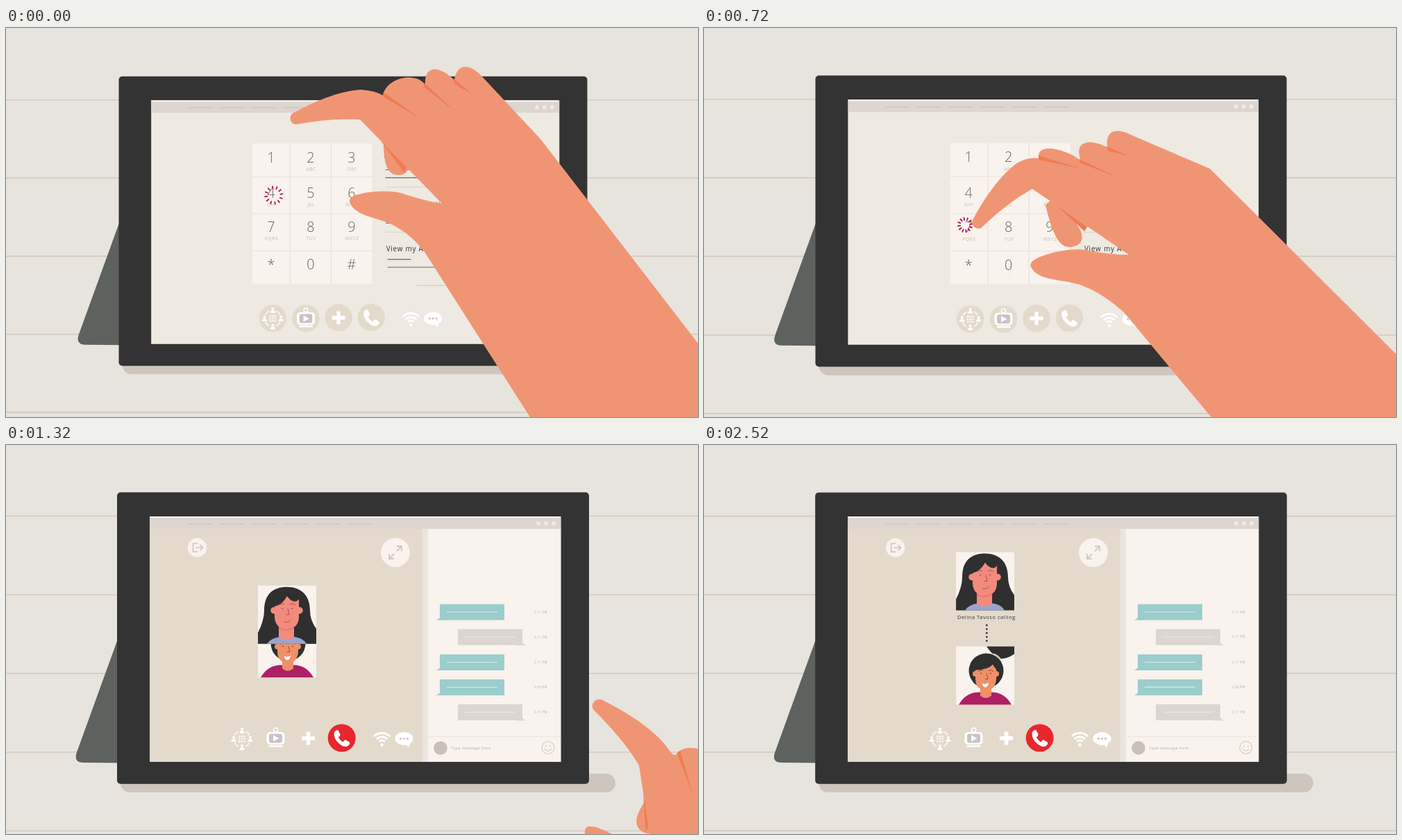
These frames come from a looping animation (997 px wide and 561 px high, 2560 ms). An HTML page with a canvas:

```html
<!DOCTYPE html>
<html lang="en">
<head>
<meta charset="utf-8">
<title>Tablet call</title>
<style>
html, body { margin: 0; width: 100%; height: 100%; overflow: hidden; background: #e7e4dd; }
canvas { display: block; width: 997px; height: 561px; }
</style>
</head>
<body>
<canvas id="stage" width="997" height="561"></canvas>
<script>
const g = document.getElementById("stage").getContext("2d");
const LOOP = 2560, STEP = 40;
const FONT = '"Open Sans", "Noto Sans", sans-serif';
const CREAM = "#f9f2ed", TAN = "#e4dacb", DARK = "#333333", GREY = "#ddd5d0", TEAL = "#9bcdcd";
const SKIN = "#f09574", SHADE = "#ee7c52";

const clamp = v => Math.max(0, Math.min(1, v));
const ramp = (t, a, b) => clamp((t - a) / (b - a));
const sine = u => 0.5 - 0.5 * Math.cos(Math.PI * u);
const mix = (a, b, u) => a + (b - a) * u;

function rect(x, y, w, h, color, r = 0) {
  g.fillStyle = color;
  g.beginPath();
  g.roundRect(x, y, w, h, r);
  g.fill();
}
function disc(x, y, r, color) {
  g.fillStyle = color;
  g.beginPath();
  g.arc(x, y, r, 0, 7);
  g.fill();
}
function line(x1, y1, x2, y2, color, w = 1) {
  g.strokeStyle = color;
  g.lineWidth = w;
  g.beginPath();
  g.moveTo(x1, y1);
  g.lineTo(x2, y2);
  g.stroke();
}
function fillPath(d, color) {
  g.fillStyle = color;
  g.fill(new Path2D(d));
}
function strokePath(d, color, w) {
  g.strokeStyle = color;
  g.lineWidth = w;
  g.stroke(new Path2D(d));
}
function text(s, x, y, size, color, spacing = 0, align = "left", weight = 400) {
  g.font = `${weight} ${size}px ${FONT}`;
  g.letterSpacing = spacing + "px";
  g.textAlign = align;
  g.fillStyle = color;
  g.fillText(s, x, y);
}
function group(x, y, alpha, draw) {
  if (alpha <= 0) return;
  g.save();
  g.translate(x, y);
  g.globalAlpha *= alpha;
  draw();
  g.restore();
}

// Icons, each around its own centre
function network() {
  for (let i = 0; i < 4; i++) {
    g.save();
    g.rotate(i * Math.PI / 2);
    g.strokeStyle = "#fff";
    g.lineWidth = 1.4;
    g.beginPath();
    g.arc(0, 0, 12, 0.45, 1.12);
    g.stroke();
    g.restore();
    const x = 12 * Math.cos(i * Math.PI / 2), y = 12 * Math.sin(i * Math.PI / 2);
    disc(x, y - 2.2, 2, "#fff");
    fillPath(`M${x - 3.6},${y + 4}q0,-4 3.6,-4q3.6,0 3.6,4z`, "#fff");
  }
  for (let i = 0; i < 9; i++) rect(i % 3 * 3.6 - 4.7, (i / 3 | 0) * 3.6 - 4.7, 2.2, 2.2, "#fff");
}
function video() {
  g.strokeStyle = "#fff";
  g.lineWidth = 1.5;
  g.beginPath();
  g.arc(0, -12, 3, 0, 7);
  g.stroke();
  rect(-13, -9, 26, 18, "#fff", 5);
  rect(-9.5, -6.5, 19, 13, "#c9c3c8", 3);
  fillPath("M-3.5,-4.5L5,0L-3.5,4.5z", "#fff");
  rect(-10, 10, 20, 2.6, "#fff", 1.3);
}
function plus() {
  rect(-9.5, -2.8, 19, 5.6, "#fff");
  rect(-2.8, -9.5, 5.6, 19, "#fff");
}
function handset() {
  fillPath("M-11,-8Q-8,-13 -5,-11L-2,-5Q-2,-3 -5,-1Q-2,4 2,6Q4,2 6,3L11,6Q13,9 8,12Q3,14 -4,8Q-12,1 -11,-8z", "#fff");
}
function wifi() {
  g.strokeStyle = "#fff";
  g.lineWidth = 2.8;
  for (const r of [6, 11, 16.5]) {
    g.beginPath();
    g.arc(0, 8, r, -2.36, -0.78);
    g.stroke();
  }
  disc(0, 8.5, 2.3, "#fff");
}
function chat() {
  g.fillStyle = "#fff";
  g.beginPath();
  g.ellipse(0, -1, 13, 9.5, 0, 0, 7);
  g.fill();
  fillPath("M1,6L7,12L9,4z", "#fff");
  for (const x of [-5, 0, 5]) disc(x, -1, 1.6, "#cfc6bd");
}

function tablet() {
  for (let i = 0; i < 5; i++) line(-20, 102.5 + i * 113.5, 1020, 102.5 + i * 113.5, "#d4c8c1", 1.7);
  fillPath("M161,280L102,443Q97,457 110,458L161,458.5z", "#5e625e");
  rect(165, 474, 713, 27, "#cec5bc", 13.5);
  rect(160, 68.3, 680, 420.5, DARK, 5);
  rect(207, 103, 592.5, 354, "#eee9e1");
}
function topBar() {
  rect(207, 105, 592.5, 16, GREY);
  line(207, 104, 797.5, 104, "#fbf5f0", 1.8);
  for (let i = 0; i < 6; i++) line(261 + i * 46, 113.7, 296 + i * 46, 113.7, "#cdc3be", 1.2);
  for (let i = 0; i < 3; i++) disc(767 + i * 11, 113, 3, "#f1e9e4");
}

function keypad() {
  const cols = [[354, 408], [409.5, 467.5], [469, 528]];
  const rows = [[165.5, 213.5], [214.7, 267], [268.3, 321], [322.3, 370]];
  const letters = ["", "ABC", "DEF", "GHI", "JKL", "MNO", "PQRS", "TUV", "WXYZ", "", "-", ""];
  rect(354, 165.5, 174, 204.5, "#ebe4de");
  [..."123456789*0#"].forEach((key, i) => {
    const [x1, x2] = cols[i % 3], row = i / 3 | 0, [y1, y2] = rows[row];
    const x = [381, 438.5, 498][i % 3], y = [193, 244.5, 294, 349][row];
    rect(x1, y1, x2 - x1, y2 - y1, CREAM);
    text(key, x, y, 20, "#6b6765", 0, "center", 300);
    text(letters[i], x + 0.7, y + (row === 3 ? 9 : 12.7), 6.8, "#c4bcb7", 0.5, "center");
  });

  const list = [["Your Vomber", 545, 192], ["Your Subscriptions", 546, 258], ["View my Account", 548, 322]];
  list.forEach(([label, x, y]) => {
    text(label, x, y, 10, DARK, 0.75);
    line(x + 2, y + 12, x + 36, y + 12, "#6a6865", 1.2);
    line(x + 2, y + 23.5, x + 94, y + 23.5, "#6a6865", 1.2);
  });
  line(547, 229, 640, 229, "#dad1c6");
  line(547, 294.5, 640, 294.5, "#dad1c6");
  line(592, 372, 684, 372, "#cfc6ba");

  [[383.5, 420, network], [431.5, 420, video], [479, 419, plus], [526.5, 418.5, handset]].forEach(([x, y, icon]) => {
    disc(x, y, 19.8, TAN);
    group(x, y, 1, icon);
  });
  group(584, 421, 1, wifi);
  group(616, 421, 1, chat);
}

function burst(t, x, y, start) {
  const k = (t - start) / 240;
  if (k < 0 || k > 1) return;
  const inner = 4 + 8.5 * k, outer = inner + 4.8;
  for (let i = 0; i < 12; i++) {
    const a = i * Math.PI / 6 - 0.15, c = Math.cos(a), s = Math.sin(a);
    line(x + c * inner, y + s * inner, x + c * outer, y + s * outer, "#b3124f", 1.8);
  }
}

// Portraits in an 84 px square
function caller() {
  const skin = "#f28b7d", ink = "#a04a48";
  rect(0, 0, 84, 84, CREAM);
  fillPath("M9,36C9,12 22,2 42,2C62,2 75,14 75,36Q75,50 84,62V84H0V68Q9,50 9,36z", "#2f2f2f");
  fillPath("M13,84Q18,76 31,74H53Q66,76 70,84z", "#9aa5cf");
  fillPath("M30,55H52V75Q41,82 30,75z", skin);
  disc(23, 36, 4.8, skin);
  disc(60, 36, 4.8, skin);
  fillPath("M24,30Q35,28 42,15Q47,21 59,20V46Q58,62 41,64Q25,61 24,46z", skin);
  strokePath("M30,61Q41,67 52,60", "#dd7568", 1.5);
  fillPath("M42,15Q49,13 58,18Q59,22 54,23Q47,23 42,15z", "#2f2f2f");
  disc(35, 33, 1, ink);
  disc(49, 33, 1, ink);
  strokePath("M30,28q4,-3 8,-1M46,27q4,-2 8,1M43,33l2,9h-5M38,52q6,3 9,-3", ink, 0.9);
}
function callee() {
  const skin = "#ee9069", ink = "#8d4334";
  rect(0, 0, 84, 84, CREAM);
  fillPath("M44,0H84V11Q74,18 62,18Q52,12 44,0z", "#2f2f2f");
  fillPath("M47,12Q56,6 65,18L58,25z", "#d8cdb4");
  disc(43.5, 35, 25, "#2f2f2f");
  fillPath("M4,84Q14,66 34,66H51Q70,66 80,84z", "#ad2064");
  fillPath("M35,56H51V71Q43,78 35,71z", skin);
  disc(28, 39.5, 4, skin);
  disc(58, 39.5, 4, skin);
  fillPath("M28,34Q46,34 53,26Q55,30 58,33V48Q56,63 43,64Q29,62 28,48z", skin);
  disc(36, 39, 1, ink);
  disc(50, 39, 1, ink);
  strokePath("M32,36q4,-3 7,-1M47,35q4,-2 7,1M44,39l2,8h-4", ink, 0.9);
  fillPath("M38,53Q43,56 47,52Q46,59 42,59Q38,58 38,53z", "#fff");
}

function chatPanel() {
  rect(600, 121, 8.5, 336, "#ebe5df");
  rect(608, 121, 191.5, 336, CREAM);
  [229.5, 265.5, 302, 338, 374].forEach((y, i) => {
    const mine = i % 3 === 1, x = mine ? 651 : 625;
    const tail = mine ? `M740,${y + 17}L749,${y + 23.5}H735z` : `M629,${y + 17}L620,${y + 23}H635z`;
    fillPath(tail, mine ? GREY : TEAL);
    rect(x, y, 93, 23, mine ? GREY : TEAL);
    line(x + 10, y + 11.3, x + 83, y + 11.3, mine ? "#ece5e0" : "#cfe6e4", 1.3);
    text(i === 3 ? "2:09 PM" : "2:11 PM", 761, y + 13, 4.4, "#b3aca8", 0.35);
  });
  line(608, 420.5, 799, 420.5, "#eee6e0");
  disc(626, 437, 9.8, "#c9c0b8");
  text("Type message here", 641, 439, 5.6, "#b0a8a3", 0.45);
  strokePath("M790,436.5a9,9 0 1 1 -18,0a9,9 0 1 1 18,0M776,438.5q5,5 10,0", "#d5cbc4", 1.1);
  disc(778, 434, 1, "#d5cbc4");
  disc(784, 434, 1, "#d5cbc4");
}

function callScreen(t) {
  rect(207, 121, 393, 336, "#e5e6db");
  const half = 145 * Math.max(0, t - 880) / 160;
  const left = Math.max(207, 395 - half), right = Math.min(600, 395 + half);
  rect(left, 121, right - left, 336, TAN);
  group(190 * (1 - sine(ramp(t, 880, 1000))), 0, 1, chatPanel);

  group(275.5, 148, ramp(t, 920, 1000), () => {
    disc(0, 0, 13.7, CREAM);
    strokePath("M1,-6H-6V6H1M-2,0H8M4,-4L8,0L4,4", "#cfc6c0", 1.7);
  });
  group(561, 155, ramp(t, 960, 1100), () => {
    disc(0, 0, 21, CREAM);
    strokePath("M2,-2L9,-9M2,-9H9V-2M-2,2L-9,9M-2,9H-9V2", "#cfc6c0", 1.8);
  });

  const split = sine(ramp(t, 1120, 1610));
  if (t >= 1120) group(363, mix(229.5, 290.5, split), 1, callee);
  group(363, mix(229.5, 154.5, split), ramp(t, 880, 960), caller);

  group(340, 424, 1, network);
  group(388.5, 423, 1, video);
  group(435.5, 423, 1, plus);
  disc(483.7, 422.5, 20, "#e8262d");
  group(483.7, 422.5, 1, handset);
  group(586, 421, 0.8 * (1 - ramp(t, 960, 1120)), wifi);
  group(541.5, 424, 1, wifi);
  group(573.5, 424.5, 1, chat);

  group(0, 0, ramp(t, 1720, 1880), () => text("Delina Tavoso calling", 365, 251, 7.5, DARK, 0.55));
  for (let i = 0; i < 5; i++) if (t >= 1880 + i * 80) disc(407.3, 260 + i * 5.6, 1.4, DARK);
}

// Hand: one outline whose points follow bones; a pose holds x, y, degrees and scale per bone
const PIVOTS = {
  low: [605, 326], thumb: [628, 253], index: [510, 132], curl: [566, 212],
  mid: [543, 97], tips: [646, 75], top: [770, 160]
};
const BONES = Object.keys(PIVOTS);
const pose = (...bones) => bones.map(([x, y, deg = 0, scale = 1]) => [x, y, deg, scale]);
const shift = (p, dx, dy) => p.map(([x, y, deg, scale]) => [x + dx, y + dy, deg, scale]);

const lifted = pose(...Object.values(PIVOTS));
const second = pose([672, 372, -1.5], [697, 299], [580, 177, -3], [632, 255], [610, 139], [708, 117, 4], [838, 202, -1.2]);
const reach = pose([605, 410, -7.2], [612, 327, -7.9, 1.07], [473, 232, -33], [533, 315, -15, 1.1],
  [482, 188, -18], [581, 172, -17], [729, 203, -7.5]);
const raised = pose([636, 282, 3], [648, 195, 14.8, 0.95], [570, 30, 25], [600, 134, 12],
  [603, -2, 14], [685, 14, 8], [808, 114, 3.3]);
const leaving = pose([872, 659, 39], [936, 617, 31, 0.9], [912, 462, 55, 1.12], [916, 557, 36],
  [968, 443, 39], [1062, 490, 39], [1105, 634, 39]);

const KEYS = [
  [0, lifted], [80, shift(lifted, 14, -10)], [230, shift(second, 12, 48)], [360, second],
  [480, shift(second, -14, -12)], [660, shift(reach, -9, 6)], [720, reach], [860, shift(reach, 112, 100)],
  [1040, raised], [1100, shift(raised, 14, -4)], [1320, leaving], [1480, shift(leaving, 190, 120)]
];

function poseAt(t) {
  const i = Math.max(0, KEYS.findIndex(k => k[0] > t) - 1);
  const key = n => KEYS[Math.max(0, Math.min(KEYS.length - 1, n))];
  const [k0, k1, k2, k3] = [key(i - 1), key(i), key(i + 1), key(i + 2)];
  const span = k2[0] - k1[0], u = (t - k1[0]) / span, v = 1 - u;
  return lifted.map((bone, b) => bone.map((_, c) => {
    const [p0, p1, p2, p3] = [k0, k1, k2, k3].map(k => k[1][b][c]);
    const m1 = (p2 - p0) / (k2[0] - k0[0]) * span, m2 = (p3 - p1) / (k3[0] - k1[0]) * span;
    return p1 * v * v * (1 + 2 * u) + m1 * u * v * v + p2 * u * u * (3 - 2 * u) - m2 * u * u * v;
  }));
}

function hand(t) {
  if (t >= 1480) return;
  const now = poseAt(t);
  const [low, thumb, index, curl, mid, tips, top] = BONES.map((name, b) => {
    const [px, py] = PIVOTS[name], [x, y, deg, scale] = now[b];
    const a = deg * Math.PI / 180, c = Math.cos(a) * scale, s = Math.sin(a) * scale;
    return (qx, qy) => [x + (qx - px) * c - (qy - py) * s, y + (qx - px) * s + (qy - py) * c];
  });
  const curve = (a, b, c) => g.bezierCurveTo(...a, ...b, ...c);
  const triangle = (a, b, c) => {
    g.fillStyle = SHADE;
    g.beginPath();
    g.moveTo(...a);
    g.lineTo(...b);
    g.lineTo(...c);
    g.fill();
  };

  g.fillStyle = SKIN;
  g.beginPath();
  g.moveTo(...curl(544, 150));
  curve(curl(543, 195), curl(548, 212), curl(566, 212));
  curve(curl(578, 212), curl(584, 203), curl(577, 185));
  g.lineTo(...curl(562, 140));
  g.fill();

  const base = index(510, 132), crotch = thumb(628, 253);
  const edge = u => [mix(base[0], crotch[0], u), mix(base[1], crotch[1], u)];
  const [ex, ey] = edge(0.57);
  triangle(edge(0.25), [ex, ey], [ex - 4, ey + 7]);

  g.fillStyle = SKIN;
  g.beginPath();
  g.moveTo(...low(1089, 1085));
  g.lineTo(...low(605, 326));
  curve(thumb(590, 305), thumb(575, 293), thumb(555, 283));
  curve(thumb(530, 272), thumb(500, 270), thumb(495, 250));
  curve(thumb(493, 236), thumb(555, 231), thumb(575, 240));
  g.quadraticCurveTo(...thumb(610, 251), ...crotch);
  g.lineTo(...base);
  curve(index(480, 130), index(450, 133), index(418, 139));
  curve(index(408, 139), index(406, 124), index(417, 121));
  curve(index(450, 103), index(485, 90), index(512, 89));
  g.quadraticCurveTo(...index(530, 90), ...mid(543, 97));
  curve(mid(548, 72), tips(590, 62), tips(604, 82));
  curve(tips(602, 55), tips(622, 52), tips(646, 75));
  curve(tips(650, 50), tips(668, 52), tips(684, 68));
  g.lineTo(...top(770, 160));
  g.lineTo(...top(1319, 873));
  g.fill();

  triangle(mid(544, 93), mid(598, 131), mid(543, 99));
  triangle(tips(602, 79), tips(648, 121), tips(602, 85));
  triangle(tips(645, 73), tips(671, 95), tips(646, 81));
}

const ZOOM = [[0, 0.9926], [360, 0.9963], [720, 0.9985], [1040, 1], [2240, 1], [LOOP, 0.9993]];
function zoomAt(t) {
  const i = ZOOM.findIndex(k => k[0] > t);
  const [a, from] = ZOOM[i - 1], [b, to] = ZOOM[i];
  return mix(from, to, (t - a) / (b - a));
}

function draw(t) {
  g.fillStyle = "#e7e4dd";
  g.fillRect(0, 0, 997, 561);
  g.save();
  const zoom = zoomAt(t);
  g.translate(500, 275);
  g.scale(zoom, zoom);
  g.translate(-500, -275);
  tablet();
  g.save();
  g.beginPath();
  g.rect(207, 103, 592.5, 354);
  g.clip();
  if (t < 960) {
    keypad();
    burst(t, 385, 241, -140);
    burst(t, 498, 241, 230);
    burst(t, 376, 284, 650);
  }
  group(0, 0, ramp(t, 860, 960), () => callScreen(t));
  topBar();
  g.restore();
  g.restore();
  hand(t);
}

const start = performance.now();
function tick() {
  const t = (performance.now() - start) % LOOP;
  draw(Math.floor(t / STEP) * STEP);
  requestAnimationFrame(tick);
}
tick();
</script>
</body>
</html>
```
